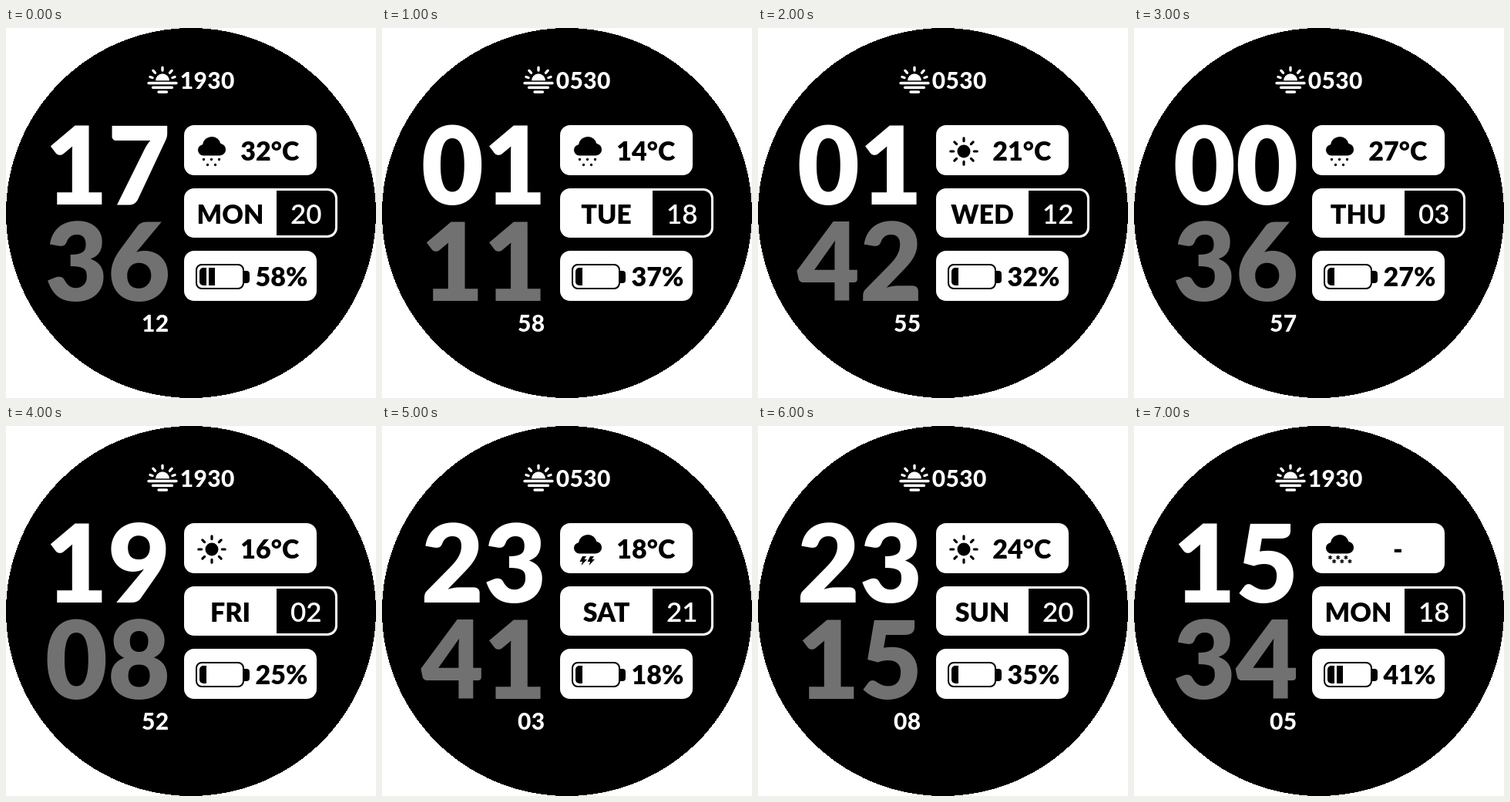
An HTML page for the animation above (8000 ms loop, 480x480 px).

```html
<!DOCTYPE html>
<html lang="en">
<head>
<meta charset="utf-8">
<title>Watch face</title>
<style>
html, body { margin: 0; width: 100%; height: 100%; overflow: hidden; background: #fff; }
svg { display: block; width: 100vw; height: 100vh; }
text { font-family: Lato, sans-serif; font-weight: 900; text-anchor: middle; }
.big { font-size: 140px; }
.label { font-size: 34px; }
.date { font-size: 35px; font-weight: 600; }
.small { font-size: 30px; font-weight: 800; letter-spacing: .3px; }
.line { fill: none; stroke-linecap: round; }
</style>
</head>
<body>
<svg viewBox="0 0 480 480">
  <defs>
    <path id="cloud" d="M256 165.500a7.200 7.200 0 0 1-1-14.300a12 12 0 0 1 23.500-1.200a7.800 7.800 0 0 1-1 15.500z"/>
  </defs>
  <circle cx="240" cy="240" r="240" shape-rendering="crispEdges"/>

  <g fill="#fff">
    <path d="M194 68.300a9 9 0 0 1 18 0z"/>
    <g class="line" stroke="#fff" stroke-width="3.400">
      <path d="M185 71.500h36M190.500 77.300h25M198 83h10.500"/>
      <path d="M203 51.300v3.700M190.800 55.200l2.700 3M215.200 55.200l-2.700 3M187 63.500l3 1M219 63.500l-3 1"/>
    </g>
    <text id="sunrise" class="small" x="261.200" y="78.500"/>
    <text id="hour" class="big" x="132" y="229"/>
    <text id="minute" class="big" x="132" y="354" fill="#717171"/>
    <text id="second" class="small" x="193.700" y="394"/>
    <rect x="231" y="126" width="172" height="65" rx="13"/>
    <rect x="231" y="208" width="199" height="64" rx="13"/>
    <rect x="231" y="289" width="172" height="65" rx="13"/>
  </g>

  <path d="M351 211h66a10 10 0 0 1 10 10v38a10 10 0 0 1-10 10h-66z"/>
  <g id="rain" class="sky">
    <use href="#cloud"/>
    <path class="line" stroke="#000" stroke-width="3.400" d="M256.500 170.500h0M266.500 170.500h0M276.500 170.500h0M261.500 177.500h0M271.500 177.500h0"/>
  </g>
  <g id="storm" class="sky">
    <use href="#cloud"/>
    <path d="M260 169h5l-2.500 4h3.500l-7.500 8 1.500-5h-3.500zM270 169h5l-2.500 4h3.500l-7.500 8 1.500-5h-3.500z"/>
  </g>
  <g id="snow" class="sky">
    <use href="#cloud"/>
    <path id="flakes" class="line" stroke="#000" stroke-width="1.200"/>
  </g>
  <g id="sun" class="sky">
    <circle cx="267" cy="160" r="8.500"/>
    <path id="rays" class="line" stroke="#000" stroke-width="3.200"/>
  </g>
  <text id="temp" class="label" x="342.300" y="172"/>
  <text id="day" class="label" x="291" y="254"/>
  <text id="date" class="date" x="389.200" y="254" fill="#fff"/>

  <rect x="247" y="307" width="61" height="31" rx="7" fill="none" stroke="#000" stroke-width="2"/>
  <path d="M308 315h4a4 4 0 0 1 4 4v8a4 4 0 0 1-4 4h-4z"/>
  <path d="M260 311v23h-4a5 5 0 0 1-5-5v-13a5 5 0 0 1 5-5z"/>
  <rect id="bar" x="263" y="311" width="8" height="23"/>
  <text id="charge" class="label" x="357.500" y="335"/>
</svg>
<script>
const STEP = 1000;
const fields = ["sunrise", "hour", "minute", "second", "temp", "day", "date", "charge"];
const steps = [
  ["1930 17 36 12 32°C MON 20 58%", "rain"],
  ["0530 01 11 58 14°C TUE 18 37%", "rain"],
  ["0530 01 42 55 21°C WED 12 32%", "sun"],
  ["0530 00 36 57 27°C THU 03 27%", "rain"],
  ["1930 19 08 52 16°C FRI 02 25%", "sun"],
  ["0530 23 41 03 18°C SAT 21 18%", "storm"],
  ["0530 23 15 08 24°C SUN 20 35%", "sun"],
  ["1930 15 34 05 - MON 18 41%", "snow"]
];
const $ = id => document.getElementById(id);

// Spokes around a centre, between two radii.
const spokes = (x, y, r1, r2, n, turn = 0) =>
  Array.from({ length: n }, (_, i) => {
    const a = turn + i * 2 * Math.PI / n, c = Math.cos(a), s = Math.sin(a);
    return `M${x + r1 * c} ${y + r1 * s}L${x + r2 * c} ${y + r2 * s}`;
  }).join("");

$("rays").setAttribute("d", spokes(267, 160, 13.3, 17.2, 8));
$("flakes").setAttribute("d", Array.from({ length: 6 }, (_, i) =>
  spokes(254.5 + i * 5.1, i % 2 ? 175.5 : 170.5, 0, 2.3, 6, Math.PI / 6)).join(""));

let shown = -1;
function show(index) {
  if (index === shown) return;
  shown = index;
  const [values, sky] = steps[index];
  values.split(" ").forEach((value, i) => $(fields[i]).textContent = value);
  document.querySelectorAll(".sky").forEach(g => g.style.display = g.id === sky ? "" : "none");
  $("bar").style.display = parseInt($("charge").textContent) >= 40 ? "" : "none";
}

const start = performance.now();
function tick() {
  show(Math.floor((performance.now() - start) / STEP) % steps.length);
  requestAnimationFrame(tick);
}
show(0);
tick();
</script>
</body>
</html>
```
